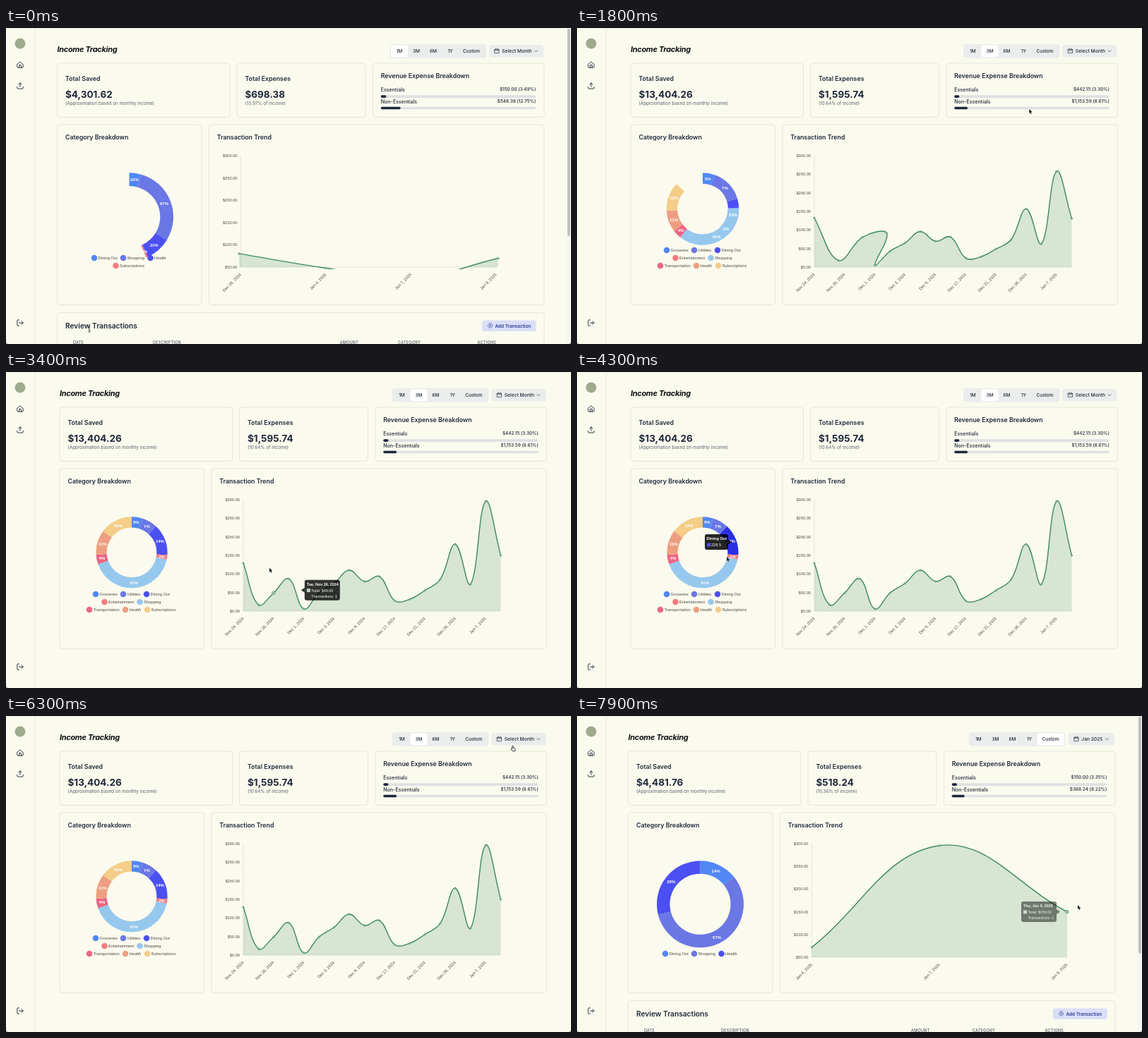
An HTML page that plays this animation: 800x448 px, repeating every 8 s.

```html
<!DOCTYPE html>
<html lang="en">
<head>
<meta charset="utf-8">
<title>Income Tracking</title>
<style>
  html, body { margin: 0; width: 100%; height: 100%; overflow: hidden; background: #fbfaee; }
  svg { display: block; width: 100vw; height: 100vh; }
  text { font-family: Inter, "Noto Sans", sans-serif; fill: #20293a; white-space: pre; }
  .chart text { font-family: "Liberation Sans", Arial, sans-serif; fill: #4a4a4a; }
  .chart .white { fill: #fff; }
  .semi { font-weight: 600; }
  .medium { font-weight: 500; }
  .bold { font-weight: 700; }
  .end { text-anchor: end; }
  .mid { text-anchor: middle; }
  .soft { fill: #586070; }
  .title { font-weight: 700; font-style: italic; letter-spacing: -.025em; fill: #111; }
  .head { font-weight: 500; letter-spacing: .05em; fill: #555c68; }
  .add { font-weight: 600; fill: #2c3a92; }
  .icon { fill: none; stroke: #20293a; stroke-width: 2; stroke-linecap: round; stroke-linejoin: round; }
  .card { fill: none; stroke: #e4e4da; stroke-width: .9; }
</style>
</head>
<body>
<svg viewBox="0 0 800 448" preserveAspectRatio="none">
  <rect width="800" height="448" fill="#fbfaee"/>
  <g id="side"></g>
  <g id="page"></g>
  <g id="charts" class="chart"></g>
  <g id="pointer"></g>
  <path d="M0 0H800M0 445V448H3Q0 448 0 445M800 445V448H797Q800 448 800 445" fill="#222" stroke="#c9c9c2" stroke-width=".5"/>
</svg>
<script>
const LOOP = 8000;
const COLORS = ['#5087f4', '#6a77e4', '#4c50f2', '#f17c80', '#96c8ee', '#ec6583', '#ee9e80', '#f4cd88'];
const $ = id => document.getElementById(id);
const clamp = v => Math.max(0, Math.min(1, v));
const lerp = (a, b, p) => a + (b - a) * p;
const outQuart = p => 1 - (1 - clamp(p)) ** 4;
const smooth = p => p * p * (3 - 2 * p);

// --- markup helpers
const text = (x, y, s, size, cls = '', more = '') =>
  `<text x="${x}" y="${y}" font-size="${size}" class="${cls}" ${more}>${s}</text>`;
const rect = (x, y, w, h, r, fill, cls = '') =>
  `<rect x="${x}" y="${y}" width="${w}" height="${h}" rx="${r}" ${fill ? `fill="${fill}"` : ''} class="${cls}"/>`;
const card = (x, y, w, h) => rect(x, y, w, h, 4, '', 'card');
const icon = (d, x, y, size, stroke = '#20293a') =>
  `<path class="icon" style="stroke:${stroke}" d="${d}" transform="translate(${x - size / 2} ${y - size / 2}) scale(${size / 24})"/>`;

// --- chart data, laid out for the page with a scrollbar
const spread = (values, right, min, bottom) => values.map((v, i) => [
  lerp(332.5, right, i / (values.length - 1)),
  bottom - (v - min) / (300 - min) * (bottom - 181)
]);
const arcs = shares => {
  let sum = 0;
  return shares.map(s => [sum, sum += s / 100]);
};
const dated = list => list.split('|').map(d => `${d}, ${d.startsWith('Jan') ? 2025 : 2024}`);

function makeChart(c) {
  c.points = spread(c.values, c.right, c.min, c.bottom);
  c.arcs = arcs(c.shares);
  c.dates = dated(c.days);
  return c;
}

const month = makeChart({
  start: -133, dx: 0, radius: 56, min: 50, bottom: 339, right: 694, step: 1,
  shares: [10, 67.3, 21.2, 1.5], values: [180, 72, 295.78, 150],
  days: 'Dec 26|Jan 4|Jan 7|Jan 9',
  legend: [[125, 326, 'Dining Out'], [166, 326, 'Shopping'], [204.5, 326, 'Health'], [155.5, 337, 'Subscriptions']]
});
const quarter = makeChart({
  start: 1400, dx: 3.5, radius: 50.5, min: 0, bottom: 339, right: 697, step: 2,
  shares: [4.7, 7.2, 14.3, 2, 41.4, 4.4, 11.2, 14.8],
  values: [129, 17, 49, 87, 6, 49, 75, 110, 80, 93, 28, 32, 56, 85, 180, 72, 295.78, 150],
  days: 'Nov 24|Nov 25|Nov 26|Nov 29|Dec 1|Dec 2|Dec 3|Dec 6|Dec 9|Dec 13|Dec 17|Dec 19|Dec 21|Dec 23|Dec 26|Jan 4|Jan 7|Jan 9',
  legend: [[123.5, 315, 'Groceries'], [162.5, 315, 'Utilities'], [195.5, 315, 'Dining Out'],
    [136, 326, 'Entertainment'], [186, 326, 'Shopping'],
    [114.5, 337, 'Transportation'], [165.5, 337, 'Health'], [196.5, 337, 'Subscriptions']]
});
const january = makeChart({
  start: 6940, dx: 0, radius: 61.5, min: 50, bottom: 342, right: 694, step: 1,
  shares: [14, 57.1, 28.9], values: [72, 295.78, 150],
  days: 'Jan 4|Jan 7|Jan 9',
  legend: [[125, 337, 'Dining Out'], [166, 337, 'Shopping'], [204.5, 337, 'Health']]
});
month.before = { radius: 67.5, arcs: [], points: [[328, 369], [451, 352], [576, 488], [699, 366]] };
quarter.before = month;
january.before = quarter;

// --- page states
const states = [
  { from: 0, chart: month, dx: 0, nav: 543.5, active: 0, button: [684, 'Select Month'], thumb: 294,
    saved: '$4,301.62', spent: '$698.38', share: '13.97', bars: [['$150.00', '3.49'], ['$548.38', '12.75']],
    columns: [95, 208, 472.5, 555, 667.5] },
  { from: 1200, chart: month, dx: 3.5, nav: 543.5, active: 0, button: [684, 'Select Month'],
    saved: '$14,301.62', spent: '$698.38', share: '4.66', bars: [['$150.00', '1.05'], ['$548.38', '3.83']] },
  { from: 1400, chart: quarter, dx: 3.5, nav: 543.5, active: 1, button: [684, 'Select Month'],
    saved: '$13,404.26', spent: '$1,595.74', share: '10.64', bars: [['$442.15', '3.30'], ['$1,153.59', '8.61']] },
  { from: 6940, chart: january, dx: 0, nav: 555, active: 4, button: [696, 'Jan 2025'], thumb: 336,
    saved: '$4,481.76', spent: '$518.24', share: '10.36', bars: [['$150.00', '3.35'], ['$368.24', '8.22']],
    columns: [95, 204, 473, 560, 662.5] }
];
const stateAt = t => states.findLast(s => s.from <= t);

const side = () =>
  '<path d="M41 0V448" stroke="#e6e6dc" stroke-width=".9"/><circle cx="20" cy="22" r="7.5" fill="#9fab8c"/>' +
  icon('M3 10.5 12 3l9 7.5V20a1 1 0 0 1-1 1H4a1 1 0 0 1-1-1zM9 21v-8h6v8', 20, 52, 11) +
  icon('M12 15V3M7 8l5-5 5 5M3 15v4a2 2 0 0 0 2 2h14a2 2 0 0 0 2-2v-4', 20, 82, 11) +
  icon('M9 21H5a2 2 0 0 1-2-2V5a2 2 0 0 1 2-2h4M16 17l5-5-5-5M21 12H9', 20, 418, 11);

function navigation(s) {
  const centers = [13.5, 37.5, 61.5, 85.5, 115.5];
  const wide = s.active === 4 ? 38 : 24;
  const [bx, label] = s.button;
  return rect(s.nav, 23, 136.5, 19.5, 3.5, '#eaedeb') +
    rect(s.nav + centers[s.active] - wide / 2, 24.5, wide, 16.5, 2.5, '#fff') +
    ['1M', '3M', '6M', '1Y', 'Custom'].map((n, i) => text(s.nav + centers[i], 35.3, n, 6.5, 'medium mid')).join('') +
    rect(bx, 24, 761 - bx, 17.5, 3.5, '#eaedeb') +
    icon('M3 5h18v16H3zM3 10h18M8 2v5M16 2v5', bx + 11, 32.5, 8) +
    text(bx + 18.3, 35.2, label, 6.7, 'medium') +
    icon('M6 9l6 6 6-6', 750.5, 32.8, 8);
}

function review(s) {
  const names = ['DATE', 'DESCRIPTION', 'AMOUNT', 'CATEGORY', 'ACTIONS'];
  return card(72.5, 403.5, 689.5, 60) +
    text(84, 426, 'Review Transactions', 10.2, 'semi') +
    rect(674, 414.5, 76.5, 15.5, 3, '#d9dff8') +
    icon('M12 2a10 10 0 1 0 .1 0M12 8v8M8 12h8', 685.5, 422, 7.5, '#2c3a92') +
    text(692.5, 424.5, 'Add Transaction', 6.4, 'add') +
    names.map((n, i) => text(s.columns[i], 448, n, 5.5, 'head')).join('') +
    rect(793, 0, 7, 448, 0, '#f7f7f2') +
    rect(795, 1, 3.8, s.thumb, 1.9, '#bdbdb9');
}

function page(s) {
  const bar = ([sum, share], i) => {
    const y = 95.3 + i * 16.4;
    return text(530.7, y - 5.2, ['Essentials', 'Non-Essentials'][i], 7.1, 'medium') +
      text(750.3, y - 6, `${sum} (${share}%)`, 6.4, 'medium end') +
      rect(530.7, y, 219.5, 3.6, 1.8, '#dee1e3') +
      rect(530.7, y, Math.max(3.8, 2.195 * share), 3.6, 1.8, '#20293a');
  };
  return `<g transform="translate(${s.dx})">` +
    text(72.5, 34.3, 'Income Tracking', 10.9, 'title') + navigation(s) +
    card(72.5, 50, 244.5, 76.5) + card(327, 50, 182, 76.5) + card(519.5, 50, 242.5, 76.5) +
    card(72.5, 137, 204.5, 255.5) + card(287.5, 137, 474.5, 255.5) +
    text(84, 75, 'Total Saved', 8.8, 'semi') + text(84, 99.3, s.saved, 13.5, 'bold') +
    text(84, 109.2, '(Approximation based on monthly income)', 6.3, 'soft') +
    text(338.5, 75, 'Total Expenses', 8.8, 'semi') + text(338.5, 99.3, s.spent, 13.5, 'bold') +
    text(338.5, 109.2, `(${s.share}% of income)`, 6.3, 'soft') +
    text(530.7, 71.3, 'Revenue Expense Breakdown', 8.8, 'semi') + s.bars.map(bar).join('') +
    text(84, 158.3, 'Category Breakdown', 8.8, 'semi') +
    text(298.7, 158.3, 'Transaction Trend', 8.8, 'semi') +
    (s.thumb ? review(s) : '') + '</g>';
}

// --- charts
function slice(cx, cy, r, a, b, fill) {
  const at = (rad, turn) => {
    const w = turn * 2 * Math.PI;
    return `${(cx + rad * Math.sin(w)).toFixed(2)} ${(cy - rad * Math.cos(w)).toFixed(2)}`;
  };
  const big = b - a > .5 ? 1 : 0, inner = r * .7;
  return `<path fill="${fill}" d="M${at(r, a)}A${r} ${r} 0 ${big} 1 ${at(r, b)}L${at(inner, b)}A${inner} ${inner} 0 ${big} 0 ${at(inner, a)}Z"/>`;
}

const sliceHover = t => clamp((t - 4100) / 150) * clamp((4650 - t) / 150);

function donut(c, p, t) {
  const cx = 174.5, r = lerp(c.before.radius, c.radius, p), cy = 205.3 + r;
  const now = c.arcs.map(([a, b], i) => {
    const [a0, b0] = c.before.arcs[i] || [0, 0];
    return [lerp(a0, a, p), lerp(b0, b, p)];
  });
  const hovered = i => c === quarter && i === 2 && sliceHover(t) > .5;
  return c.legend.map(([x, y, name], i) =>
      `<circle cx="${x}" cy="${y}" r="4.3" fill="${COLORS[i]}"/>` + text(x + 5.5, y + 1.9, name, 5.8)).join('') +
    now.map(([a, b], i) => slice(cx, cy, r, a, b, hovered(i) ? '#2a2fe4' : COLORS[i])).join('') +
    now.map(([a, b], i) => {
      const w = (a + b) * Math.PI;
      return text(cx + r * .85 * Math.sin(w), cy - r * .85 * Math.cos(w) + 2.1, Math.round(c.shares[i]) + '%', 6, 'white bold mid');
    }).join('');
}

function curve(pts) {
  const tension = .4;
  const handles = pts.map((q, i) => {
    const a = pts[i - 1] || q, b = pts[i + 1] || q;
    const d1 = Math.hypot(q[0] - a[0], q[1] - a[1]), d2 = Math.hypot(b[0] - q[0], b[1] - q[1]);
    const k = tension / (d1 + d2 || 1), vx = b[0] - a[0], vy = b[1] - a[1];
    return [q[0] - k * d1 * vx, q[1] - k * d1 * vy, q[0] + k * d2 * vx, q[1] + k * d2 * vy];
  });
  return 'M' + pts[0] + pts.slice(1).map((q, i) =>
    `C${handles[i].slice(2)} ${handles[i + 1].slice(0, 2)} ${q}`).join('');
}

function trend(c, p, active) {
  const pts = c.points.map(([x, y], i) => {
    const [x0, y0] = c.before.points[i] || [x, c.bottom];
    return [lerp(x0, x, p), lerp(y0, y, p)];
  });
  const path = curve(pts), base = c.bottom;
  const clip = (id, extra) => `<clipPath id="${id}"><rect x="320" y="170" width="390" height="${base - 170 + extra}"/></clipPath>`;
  let out = clip('area', 0) + clip('plot', 3) +
    `<path d="M332.5 181V${base}H${c.right}" fill="none" stroke="#dcddd3" stroke-width=".7"/>`;
  for (let v = c.min; v <= 300; v += 50)
    out += text(327.5, base - (v - c.min) / (300 - c.min) * (base - 181) + 2, `$${v}.00`, 5.7, 'end');
  c.dates.forEach((d, i) => {
    const x = c.points[i][0] + 1;
    if (i % c.step === 0) out += text(x, base + 11, d, 5.8, 'end', `transform="rotate(-45 ${x} ${base + 11})"`);
  });
  return out +
    `<path clip-path="url(#area)" d="${path}L${pts.at(-1)[0]} ${base}H${pts[0][0]}Z" fill="#3d8b5b" fill-opacity=".19"/>` +
    `<g clip-path="url(#plot)" stroke="#3d8b5b"><path d="${path}" fill="none" stroke-width="1.4"/>` +
    pts.map(([x, y], i) => `<circle cx="${x}" cy="${y}" r="${i === active ? 2.2 : 1.2}" fill="#a9c9ae" stroke-width=".7"/>`).join('') + '</g>';
}

// --- pointer
const route = [
  [0, 118, 427], [150, 118, 427], [1050, 580, 39], [1500, 580, 39], [2100, 700, 190], [2380, 697, 210],
  [2500, 677, 220], [2700, 668, 228], [3500, 360, 280], [4200, 212, 262], [4520, 212, 262], [5200, 693, 62],
  [5600, 725, 35], [6200, 725, 35], [6800, 626, 137], [7200, 626, 137], [7450, 640, 230], [7750, 685, 280], [7900, 709, 268], [LOOP, 712, 267]
];
function pointerAt(t) {
  const i = route.findLastIndex(k => k[0] <= t), a = route[i], b = route[i + 1] || a;
  const p = smooth((t - a[0]) / (b[0] - a[0] || 1));
  return [lerp(a[1], b[1], p), lerp(a[2], b[2], p)];
}
function pointer(t) {
  const [x, y] = pointerAt(t), move = `transform="translate(${x} ${y})"`;
  if (x < 190 && y > 415)
    return `<path ${move} d="M-1.5 -4Q0 -4 0 -3Q0 -4 1.5 -4M0 -3V3.2M-1.5 4.2Q0 4.2 0 3.2Q0 4.2 1.5 4.2M-.9 1.4H.9" fill="none" stroke="#222" stroke-width=".8"/>`;
  if (x > 545 && y < 43)
    return `<path ${move} d="M-.8 0Q0 -1 .7 0V2.6L3.2 3.2Q4 3.6 3.8 4.8L3.2 7H-.4L-2.6 4.2Q-2.4 3.2 -.8 4.2Z" fill="#fff" stroke="#111" stroke-width=".8" stroke-linejoin="round"/>`;
  return `<path ${move} d="M0 0V6L1.4 4.8 2.4 7 3.4 6.6 2.4 4.4H4.3Z" fill="#111" stroke="#fff" stroke-width=".5" paint-order="stroke"/>`;
}

// --- tooltips
function hoverAt(t, c, dx) {
  const [px, y] = pointerAt(t), x = px - dx;
  if (y < 181 || y > c.bottom || x < 332.5 || x > c.right + .5) return -1;
  return Math.round((x - 332.5) / (c.right - 332.5) * (c.points.length - 1));
}
const tipPlace = (c, i) => {
  const [x, y] = c.points[i];
  return [x < 523 ? x + 15 : x - 65, y - 14.5];
};
const tipPosition = (h, t) => h.to.map((v, k) => lerp(h.start[k], v, outQuart((t - h.t) / 400)));

const hovers = [{ t: 0, i: -1 }];
for (let t = 0; t < LOOP; t += 10) {
  const { chart, dx } = stateAt(t), i = hoverAt(t, chart, dx), last = hovers.at(-1);
  if (i === last.i) continue;
  const h = { t, i, chart };
  if (i >= 0) {
    h.to = tipPlace(chart, i);
    h.start = last.i >= 0 ? tipPosition(last, t) : h.to;
    h.born = last.i >= 0 ? last.born : t;
  }
  hovers.push(h);
}

function trendTip(t, c) {
  const n = hovers.findLastIndex(h => h.t <= t), gone = hovers[n].i < 0;
  const h = gone ? hovers[n - 1] : hovers[n];
  if (!h || h.i < 0 || h.chart !== c) return { active: -1, html: '' };
  const alpha = gone ? clamp(1 - (t - hovers[n].t) / 200) : clamp((t - h.born) / 200);
  if (!alpha) return { active: -1, html: '' };
  const [x, y] = tipPosition(h, t), date = c.dates[h.i], value = c.values[h.i];
  const day = new Date(date).toLocaleDateString('en-US', { weekday: 'short' });
  const caret = c.points[h.i][0] < 523 ? `M${x} ${y + 11}l-5 3.5 5 3.5` : `M${x + 50} ${y + 11}l5 3.5 -5 3.5`;
  return {
    active: h.i,
    html: `<g opacity="${alpha}">` + rect(x, y, 50, 29, 3, 'rgba(0,0,0,.8)') + `<path d="${caret}" fill="rgba(0,0,0,.8)"/>` +
      text(x + 3, y + 8, `${day}, ${date}`, 5.4, 'white bold') +
      rect(x + 3, y + 12.3, 5, 5, 0, '#b9d3bd') +
      text(x + 9.5, y + 17, `Total: $${value.toFixed(2)}`, 5.4, 'white') +
      text(x + 9.5, y + 25, `Transactions: ${value > 200 ? 2 : 1}`, 5.4, 'white') + '</g>'
  };
}

const sliceTip = t => `<g opacity="${sliceHover(t)}">` + rect(177.5, 230, 33, 22, 3, 'rgba(0,0,0,.85)') +
  '<path d="M210.5 237.5l5 3.5 -5 3.5" fill="rgba(0,0,0,.85)"/>' +
  text(180, 238, 'Dining Out', 5.6, 'white bold') +
  rect(180.5, 242.5, 5, 5, 0, '#4c50f2') + text(186.5, 247.2, '228.5', 5.6, 'white') + '</g>';

// --- playback
let shown;
function draw(now) {
  const t = now % LOOP, s = stateAt(t), c = s.chart;
  if (s !== shown) $('page').innerHTML = page(shown = s);
  const p = outQuart((t - c.start) / 1000), tip = trendTip(t, c);
  $('charts').setAttribute('transform', `translate(${s.dx})`);
  $('charts').innerHTML = donut(c, p, t) + trend(c, p, tip.active) + tip.html + (sliceHover(t) ? sliceTip(t) : '');
  $('pointer').innerHTML = pointer(t);
}
$('side').innerHTML = side();
const begin = performance.now();
const tick = () => {
  draw(performance.now() - begin);
  requestAnimationFrame(tick);
};
tick();
</script>
</body>
</html>
```
